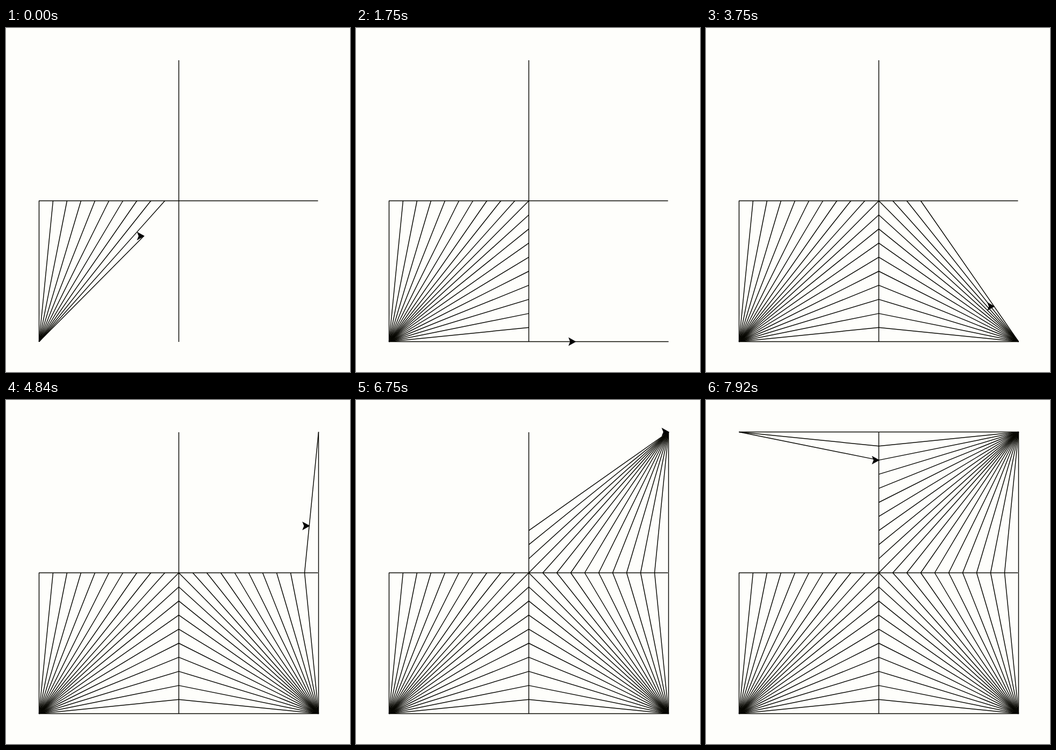
Animation of 640 by 640 pixels, one loop 8000 ms. Source, as an HTML page:

```html
<!DOCTYPE html>
<html lang="en">
<head>
<meta charset="utf-8">
<title>Turtle string art</title>
<style>
  html, body { margin: 0; width: 100%; height: 100%; overflow: hidden; background: #fefefb; }
  svg { display: block; width: 100%; height: 100%; }
  .line { fill: none; stroke: #060600; stroke-width: 1.45; }
  .turtle { fill: #000; stroke: #000; stroke-width: 1.3; }
</style>
</head>
<body>
<svg viewBox="0 0 640 640">
  <path class="line" d="M321.5 60V584M61 321.5H580.5"/>
  <g class="line" id="trail"></g>
  <path class="turtle" id="turtle" d="M0 0L-11.7 -6.5L-9.1 0L-11.7 6.5Z"/>
</svg>
<script>
const LOOP = 8000;
const MAX_HOP = 77.8; // longest hop, in turtle units
const trail = document.getElementById('trail');
const turtle = document.getElementById('turtle');

const sx = x => 321.5 + x * 1.3;
const sy = y => 321.5 - y * 1.31;
const pt = (x, y) => sx(x).toFixed(2) + ' ' + sy(y).toFixed(2);

// Each corner is joined to points along one half axis, then along the next.
const moves = [];
let pos = [-200, -200];
let total = 0;
let startHop = 0;

function goTo(x, y) {
  const [x0, y0] = pos;
  const hops = 1 + Math.floor(Math.hypot(x - x0, y - y0) / MAX_HOP);
  const path = document.createElementNS('http://www.w3.org/2000/svg', 'path');
  // A move back over the last line leaves nothing new to draw.
  const prev = moves[moves.length - 1];
  const retrace = prev && prev.x0 === x && prev.y0 === y;
  if (!retrace) trail.append(path);
  moves.push({ x0, y0, x, y, hops, path, first: total });
  total += hops;
  pos = [x, y];
}

function fan(corner, from, to) {
  goTo(...corner);
  for (let half = 0; half < 2; half++) {
    for (let i = 0; i <= 10; i++) {
      const k = half ? i / 10 : 1 - i / 10;
      const end = half ? to : from;
      if (k === 0 && !startHop) startHop = total + 3;
      goTo(end[0] * k, end[1] * k);
      if (!(half && i === 10)) goTo(...corner);
    }
  }
}

const W = [-200, 0], S = [0, -200], E = [200, 0], N = [0, 200];
fan([-200, -200], W, S);
fan([200, -200], S, E);
fan([200, 200], E, N);
fan([-200, 200], N, W);

// Hops made by certain ticks; the pace wavers slightly around four per tick.
const pace = [[0, 0], [21, 83], [30, 121], [45, 184], [58, 237], [81, 333], [95, 390]];

function hopsAt(tick) {
  let i = 1;
  while (i < pace.length - 1 && tick > pace[i][0]) i++;
  const [t0, h0] = pace[i - 1], [t1, h1] = pace[i];
  return Math.round(h0 + (h1 - h0) * (tick - t0) / (t1 - t0));
}

function draw(tick) {
  const hop = startHop + hopsAt(tick);
  let x = 0, y = 0;
  for (const m of moves) {
    if (m.first >= hop) {
      m.path.setAttribute('d', '');
      continue;
    }
    const k = Math.min(1, (hop - m.first) / m.hops);
    x = m.x0 + (m.x - m.x0) * k;
    y = m.y0 + (m.y - m.y0) * k;
    m.path.setAttribute('d', `M${pt(m.x0, m.y0)}L${pt(x, y)}`);
  }
  turtle.setAttribute('transform', `translate(${sx(x).toFixed(2)} ${sy(y).toFixed(2)})`);
}

// Twelve ticks per second, on hundredths of a second.
let start = null;
let last = -1;
function loop(now) {
  if (start === null) start = now;
  const t = (now - start) % LOOP;
  const tick = Math.floor(Math.floor(t / 10) * 12 / 100);
  if (tick !== last) draw(last = tick);
  requestAnimationFrame(loop);
}
draw(0);
requestAnimationFrame(loop);
</script>
</body>
</html>
```
